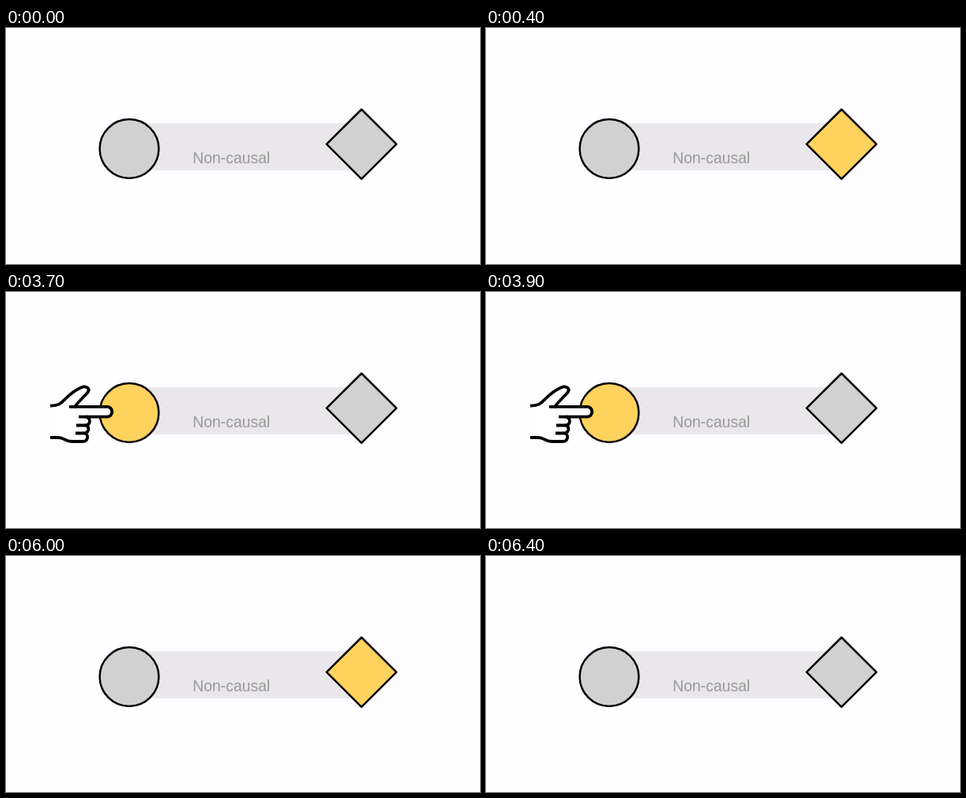
Animation of 600 by 300 pixels, one loop 8 s. Source, as an HTML page:

```html
<!DOCTYPE html>
<html lang="en">
<head>
<meta charset="utf-8">
<title>Non-causal</title>
<style>
  html, body { margin: 0; width: 100%; height: 100%; overflow: hidden; background: #fefdff; }
  svg { display: block; width: 100vw; height: 100vh; }
  text { font: 19.4px "Liberation Sans", Arial, sans-serif; fill: #99989a; }
  .shape { stroke: #000; stroke-width: 2.5; stroke-linejoin: round; }
  #hand { fill: #fff; stroke: #000; stroke-width: 3.8; stroke-linejoin: round; }
</style>
</head>
<body>
<svg viewBox="0 0 600 300">
  <rect width="600" height="300" fill="#fefdff"/>
  <rect x="156" y="121" width="294" height="60" fill="#e9e7e9"/>
  <text x="236.2" y="171.5">Non-causal</text>
  <circle id="cause" class="shape" cx="156" cy="153.5" r="37.4"/>
  <path id="effect" class="shape" d="M450 103.5L494.2 147.6L450 191.8L405.8 147.6Z"/>
  <g id="hand">
    <!-- palm, thumb and pointing finger -->
    <path d="M56 144.5C67 145 70 141 75 136C81 130 87 125 95 121.5
      C102 118.5 107 123 103.5 127.5C98 134 93 138 87 145.8
      H127.8A6.4 6.4 0 0 1 127.8 158.7H101
      C107.5 160 107.5 168.5 101 169.5
      C106 171 105.5 178.5 99.5 179.5
      C105 181 104.5 190 97 190H83C74 190 74 185 66 185H56"/>
    <!-- creases -->
    <path fill="none" d="M80 145.8H89M92 158.7H103M89 169.5H102M88 179.5H100"/>
  </g>
</svg>
<script>
  const LOOP = 8000, GREY = "#d2d1d2", YELLOW = "#ffd25d";
  const [cause, effect, hand] = ["cause", "effect", "hand"].map(id => document.getElementById(id));
  const within = (t, from, to) => t >= from && t < to;

  function draw(t) {
    const press = within(t, 3700, 4000);
    const lit = within(t, 400, 800) || within(t, 6000, 6400);
    cause.setAttribute("fill", press ? YELLOW : GREY);
    effect.setAttribute("fill", lit ? YELLOW : GREY);
    hand.setAttribute("visibility", press ? "visible" : "hidden");
  }

  const start = performance.now();
  function tick() {
    draw((performance.now() - start) % LOOP);
    requestAnimationFrame(tick);
  }
  draw(0);
  requestAnimationFrame(tick);
</script>
</body>
</html>
```
